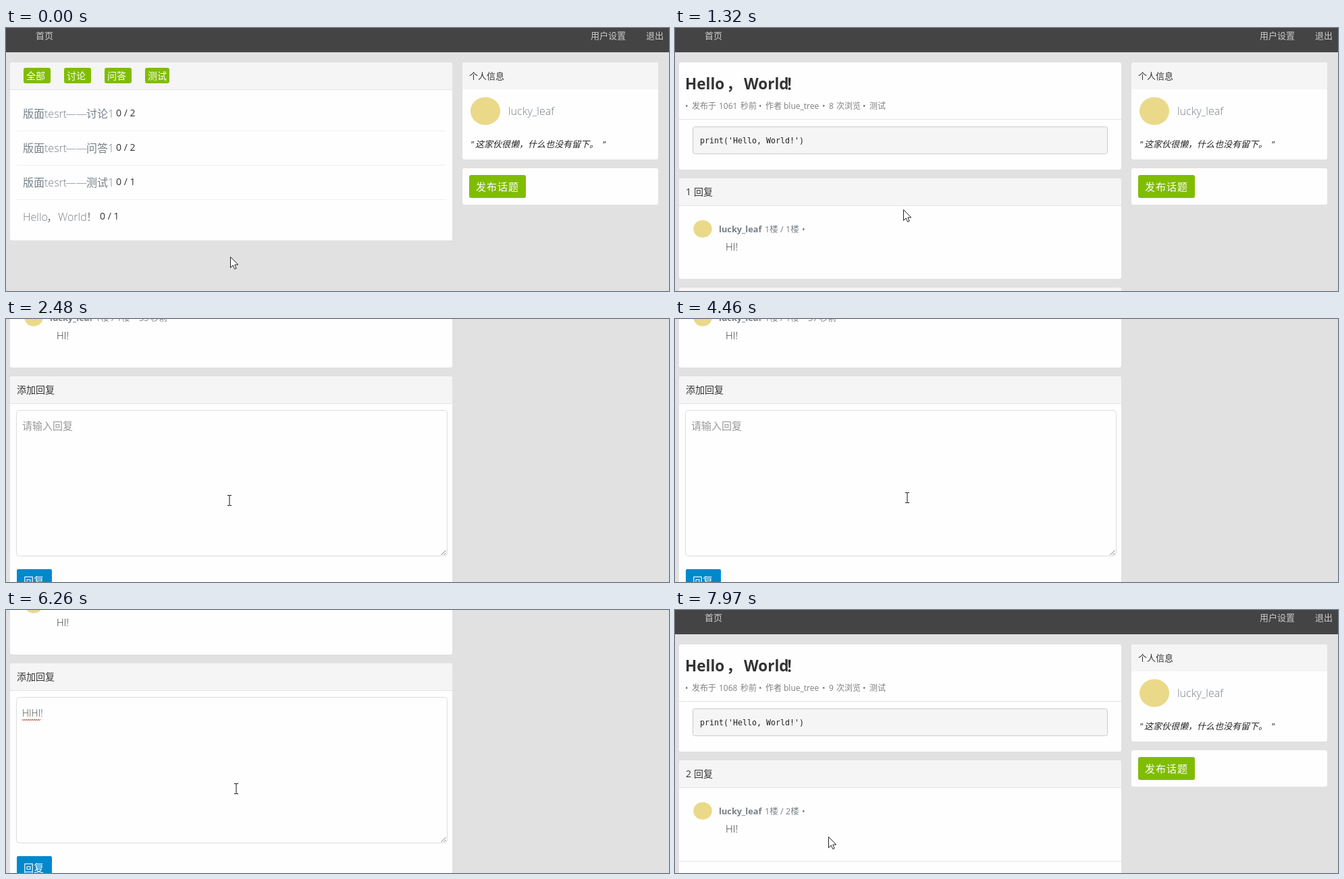
Animation of 982x390 px, one loop 8000 ms. Source, as an HTML page:

```html
<!DOCTYPE html>
<html lang="zh-CN">
<head>
<meta charset="utf-8">
<title>Forum reply</title>
<style>
html, body { margin: 0; width: 100%; height: 100%; overflow: hidden; background: #e1e1e1; }
svg { display: block; width: 982px; height: 390px; }
text { font-family: "Open Sans", "Noto Sans CJK SC", "Noto Sans CJK", sans-serif; }
.mono { font-family: "DejaVu Sans Mono", monospace; }
</style>
</head>
<body>
<svg id="stage" viewBox="0 0 982 390" xmlns="http://www.w3.org/2000/svg"></svg>
<script>
const LOOP = 8000;
const OPEN_AT = 1120, RELOAD_AT = 7160, TICK_AT = 1750, FOCUS_AT = 2600, BLUR_AT = 6950;
const KEYS = [4640, 4820, 5020, 5200, 5400];
const REPLY = 'HIHI!';
const GREEN = '#80bd01', LINK = '#778087';

// Markup helpers
const rect = (x, y, w, h, fill, rx = 0, more = '') =>
  `<rect x="${x}" y="${y}" width="${w}" height="${h}" rx="${rx}" fill="${fill}" ${more}/>`;
const text = (x, y, size, fill, str, more = '') =>
  `<text x="${x}" y="${y}" font-size="${size}" fill="${fill}" ${more}>${str}</text>`;
const words = (y, size, fill, parts, more = '') =>
  parts.map(([x, str, id]) => text(x, y, size, fill, str, (id ? `id="${id}" ` : '') + more)).join('');
const group = (id, body) => `<g id="${id}">${body}</g>`;
const head = (x, y, w) =>
  `<path d="M${x} ${y + 40}v-37q0-3 3-3h${w - 6}q3 0 3 3v37z" fill="#f5f5f5"/>`;
const rule = (x, y, w, fill = '#e3e3e3') => rect(x, y, w, 1, fill);
const avatar = (x, y, s) =>
  `<ellipse cx="${x + s / 2}" cy="${y + s * .46}" rx="${s * .46}" ry="${s * .43}" fill="#ead989"/>`;

const navBar = rect(0, 0, 982, 36, '#444') +
  words(15.5, 13, '#ccc', [[44, '首页'], [866, '用户设置'], [948, '退出']]);

const sidebar = rect(676, 51, 290, 144, '#fefefe', 3) + head(676, 51, 290) +
  text(686, 76, 13, '#333', '个人信息') +
  avatar(686, 101, 48) +
  text(744, 129, 16, LINK, 'lucky_leaf', 'font-weight="300"') +
  words(177, 13, '#222', [[688, '"'], [695, '这家伙很懒，什么也没有留下。'], [883, '"']], 'font-style="italic"') +
  rect(676, 208, 290, 54, '#fefefe', 3) +
  rect(686, 218, 84, 34, GREEN, 3) +
  text(696, 240.5, 15, '#fff', '发布话题', 'letter-spacing="1"');

const tab = (label, i) =>
  rect(26 + i * 60, 59, i < 3 ? 40 : 36, 23, GREEN, 3) + text(30 + i * 60, 76, 14, '#fff', label);

const topic = (name, i) => {
  const y = 133 + i * 51;
  return words(y, 16, LINK,
    [[25, '版面'], [57, 'tesrt'], [88, '——'], [119, name], [151, '1']], 'font-weight="300"') +
    text(163, y - 2, 14, '#333', i < 2 ? '0 / 2' : '0 / 1') +
    rule(16, y + 19, 635, '#f0f0f0');
};

const listPage = rect(6, 51, 655, 264, '#fefefe', 3) + head(6, 51, 655) + rule(6, 91, 655) +
  ['全部', '讨论', '问答', '测试'].map(tab).join('') +
  ['讨论', '问答', '测试'].map(topic).join('') +
  group('hello', words(286, 16, 'inherit', [[25, 'Hello'], [60, '，'], [77, 'World'], [119, '！']], 'font-weight="300"') +
    rect(25, 288, 103, 1, 'inherit', 0, 'id="underline"')) +
  text(139, 284, 14, '#333', '0 / 1');

const post = rect(6, 51, 655, 159, '#fefefe', 3) +
  words(91, 22.5, '#333', [[15, 'Hello'], [76, '，'], [102, 'World'], [164, '！']], 'font-weight="700"') +
  words(120, 12, '#808080', [
    [15, '•'], [25, '发布于'], [65, '', 'age'], [97, '秒前'], [124, '•'], [134, '作者'],
    [161, 'blue_tree'], [218, '•'], [228, '', 'views'], [239, '次浏览'], [278, '•'], [288, '测试']]) +
  rule(6, 135, 655) +
  rect(26.5, 146.5, 614, 40, '#f5f5f5', 3, 'stroke="#ccc"') +
  text(37, 171, 11.63, '#222', "print('Hello, World!')", 'class="mono"');

const replies = rect(6, 223, 655, 149, '#fefefe', 3, 'id="replyCard"') + head(6, 223, 655) + rule(6, 263, 655) +
  words(248, 14, '#333', [[16, '', 'total'], [28, '回复']]) +
  avatar(26, 284, 30) +
  text(65, 303, 12.8, LINK, 'lucky_leaf', 'font-weight="700"') +
  words(303, 12.5, LINK, [[133, '1楼'], [156, '/'], [164, '', 'floors'], [188, '•'], [197, '', 'seconds'], [214, '', 'unit']]) +
  text(75, 330, 15, '#333', 'HI!', 'font-weight="300"') +
  group('nextReply', rule(6, 372, 655));

const wave = 'M24 468' + 'l1.5 2l1.5 -2'.repeat(9);
const composer = rect(6, 385, 655, 345, '#fefefe', 3) + head(6, 385, 655) + rule(6, 425, 655) +
  text(16, 410, 14, '#333', '添加回复') +
  rect(15.5, 435.5, 638, 216, '#fefefe', 4, 'stroke="#ddd"') +
  '<path d="M644.5 650l7-7M648.5 650l3-3" stroke="#777" fill="none"/>' +
  text(24, 464, 15, '#999', '请输入回复', 'id="hint"') +
  text(24, 464, 14, '#444', '', 'id="typed" font-weight="300"') +
  `<path id="squiggle" d="${wave}" stroke="#e33" fill="none"/>` +
  rect(24, 448, 1, 19, '#333', 0, 'id="caret"') +
  rect(16, 671, 52, 34, '#08c', 2, 'id="send"') +
  text(26, 693.5, 15, '#fff', '回复');

const pointers =
  '<path id="arrow" d="M.5 .5v16l3.7-3.6 2.5 5.6 2.5-1.1-2.4-5.4h5z" fill="#fff" stroke="#222"/>' +
  '<path id="beam" d="M-3 -7.5h2.5l.5.5.5-.5h2.500M0 -7v14M-3 7.500h2.500l.5-.5.5.5h2.500" fill="none" stroke="#111"/>' +
  '<path id="hand" d="M-1.500 1.500q1.500-2 3 0v7q1.500-1.500 3 .5 1.500-1.200 3 .8 2-1 3 1v5.500q0 3-2 4.500v2.700h-8.500v-2.500l-6-7.500q-.5-2.500 1.500-2.200l3 2.700z" fill="#fff" stroke="#222"/>';

const stage = document.getElementById('stage');
stage.innerHTML = rect(0, 0, 982, 390, '#e1e1e1') +
  group('page', navBar + sidebar + group('list', listPage) + group('thread', post + replies + group('composer', composer))) +
  group('pointer', pointers);

const el = {};
stage.querySelectorAll('[id]').forEach(n => el[n.id] = n);
const show = (id, on) => el[id].setAttribute('display', on ? 'inline' : 'none');
const write = (id, str) => { if (el[id].textContent !== String(str)) el[id].textContent = str; };

// Eased track through [time, ...values]
function follow(track, t) {
  let i = 0;
  while (i < track.length - 2 && t >= track[i + 1][0]) i++;
  const [a, b] = [track[i], track[i + 1]];
  const p = Math.min(1, Math.max(0, (t - a[0]) / (b[0] - a[0])));
  const e = p * p * (3 - 2 * p);
  return a.slice(1).map((v, k) => v + (b[k + 1] - v) * e);
}

const MOUSE = [
  [80, 332, 339], [720, 84, 277], [960, 84, 277], [1300, 338, 269], [1420, 338, 269],
  [1720, 326, 290], [2200, 331, 269], [3300, 331, 269], [3900, 344, 265],
  [5720, 344, 265], [6050, 341, 265], [6400, 341, 265], [6880, 62, 352],
  [7160, 62, 352], [7300, 57, 344], [7850, 227, 336]
];
const SCROLL = [[1340, 0], [1690, 300], [6160, 300], [6450, 323]];

function caretOn(t) {
  if (t < FOCUS_AT || t >= BLUR_AT) return false;
  const last = KEYS.filter(k => k <= t).pop() || FOCUS_AT;
  return (t - last) % 1000 < 500;
}

function draw(t) {
  const opened = t >= OPEN_AT, sent = t >= RELOAD_AT;
  const [mx, my] = follow(MOUSE, t).map(Math.round);
  const scroll = sent ? 0 : Math.round(follow(SCROLL, t)[0]);
  el.page.setAttribute('transform', `translate(0 ${-scroll})`);
  show('list', !opened);
  show('thread', opened);

  const onLink = !opened && mx > 25 && mx < 128 && my > 268 && my < 290;
  el.hello.setAttribute('fill', onLink ? '#4d5256' : LINK);
  show('underline', onLink);

  write('age', sent ? 1068 : 1061);
  write('views', sent ? 9 : 8);
  write('total', sent ? 2 : 1);
  write('floors', sent ? '2楼' : '1楼');
  const ticking = t >= TICK_AT && !sent;
  write('seconds', ticking ? 35 + Math.floor((t - TICK_AT) / 1000) : '');
  write('unit', ticking ? '秒前' : '');
  el.replyCard.setAttribute('height', sent ? 200 : 149);
  show('nextReply', sent);
  show('composer', !sent);

  const count = KEYS.filter(k => k <= t).length;
  write('typed', REPLY.slice(0, count));
  show('hint', !count);
  show('squiggle', t >= 5500);
  show('caret', caretOn(t));
  el.caret.setAttribute('x', 24 + [0, 10, 13, 23, 27, 31][count]);

  const py = my + scroll;
  const onSend = opened && !sent && mx > 15 && mx < 69 && py > 670 && py < 706;
  const inBox = opened && !sent && mx > 15 && mx < 654 && py > 435 && py < 652;
  el.send.setAttribute('fill', onSend ? '#05c' : '#08c');
  el.send.setAttribute('stroke', onSend && t >= BLUR_AT ? '#6aa5ea' : 'none');
  show('hand', onLink || onSend);
  show('beam', inBox);
  show('arrow', !onLink && !onSend && !inBox);
  el.pointer.setAttribute('transform', `translate(${mx} ${my})`);
}

const start = performance.now();
function frame() {
  draw((performance.now() - start) % LOOP);
  requestAnimationFrame(frame);
}
frame();
</script>
</body>
</html>
```
